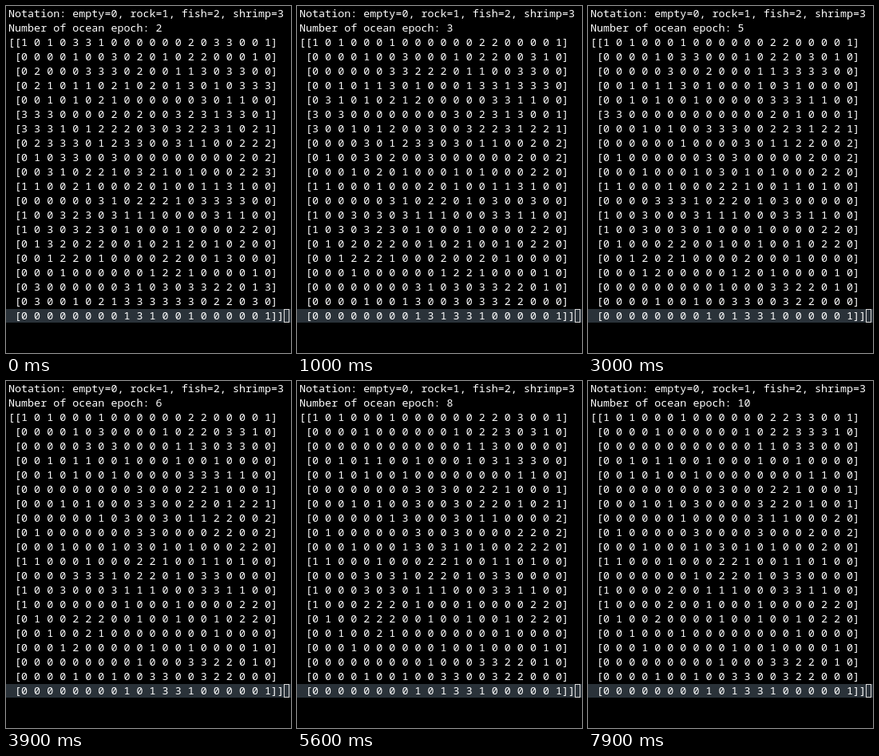
Animation, 357 px wide and 434 px high, one loop 8000 ms. Source, as an HTML page:

```html
<!DOCTYPE html>
<html lang="en">
<head>
<meta charset="utf-8">
<title>Ocean life</title>
<style>
  html, body { margin: 0; width: 100%; height: 100%; overflow: hidden; background: #000; }
  #bar { position: absolute; left: 0; top: 379px; width: 357px; height: 17px; background: #2a3239; }
  #cursor {
    position: absolute; left: 348px; top: 379px; width: 7px; height: 17px;
    box-sizing: border-box; border: 1px solid #d8d8d8;
  }
  #term {
    position: absolute; left: 3px; top: 0; margin: 0; color: #fff;
    font: 13.38px/18px "Noto Sans Mono", "DejaVu Sans Mono", monospace;
    white-space: pre; font-variant-ligatures: none;
  }
</style>
</head>
<body>
<div id="bar"></div>
<div id="cursor"></div>
<pre id="term"></pre>
<script>
const LOOP = 8000;
const FIRST_EPOCH = 2;
const STEPS = [0, 500, 1500, 2600, 3600, 4600, 5600, 6600, 7600];
const ROCK = 1, FISH = 2, SHRIMP = 3;

const seed = `
10103310000002033001
00001003020102200010
02000333020011303300
02101102102013010333
00101021000000301100
33300002020032313301
33310122203032231021
02333012330031100222
01033003000000000202
00310221032101000223
11002100020100113100
00000031022210333300
10032303111000031100
10303230100010000220
01320220010212010200
00122010000220013000
00010000001221000010
03000000310303322013
03001021333333022030
00000000131001000001`.trim().split("\n").map(row => [...row].map(Number));

function neighbours(grid, y, x, kind) {
  let n = 0;
  for (let dy = -1; dy <= 1; dy++)
    for (let dx = -1; dx <= 1; dx++)
      if ((dy || dx) && grid[y + dy]?.[x + dx] === kind) n++;
  return n;
}

function nextCell(grid, y, x) {
  const cell = grid[y][x];
  if (cell === ROCK) return ROCK;
  const count = kind => neighbours(grid, y, x, kind);
  if (cell) {
    const n = count(cell);
    return n === 2 || n === 3 ? cell : 0;
  }
  return count(FISH) === 3 ? FISH : count(SHRIMP) === 3 ? SHRIMP : 0;
}

const evolve = grid => grid.map((row, y) => row.map((_, x) => nextCell(grid, y, x)));

function render(grid, epoch) {
  const rows = grid.map(row => `[${row.join(" ")}]`).join("\n ");
  return "Notation: empty=0, rock=1, fish=2, shrimp=3\n" +
    `Number of ocean epoch: ${epoch}\n[${rows}]`;
}

const screens = [];
for (let i = 0, grid = seed; i < STEPS.length; i++, grid = evolve(grid))
  screens.push(render(grid, FIRST_EPOCH + i));

const term = document.getElementById("term");
const start = performance.now();
let shown = -1;

function draw(now) {
  const t = Math.max(0, now - start) % LOOP;
  const i = STEPS.findLastIndex(step => step <= t);
  if (i !== shown) term.textContent = screens[shown = i];
  requestAnimationFrame(draw);
}
draw(start);
</script>
</body>
</html>
```
